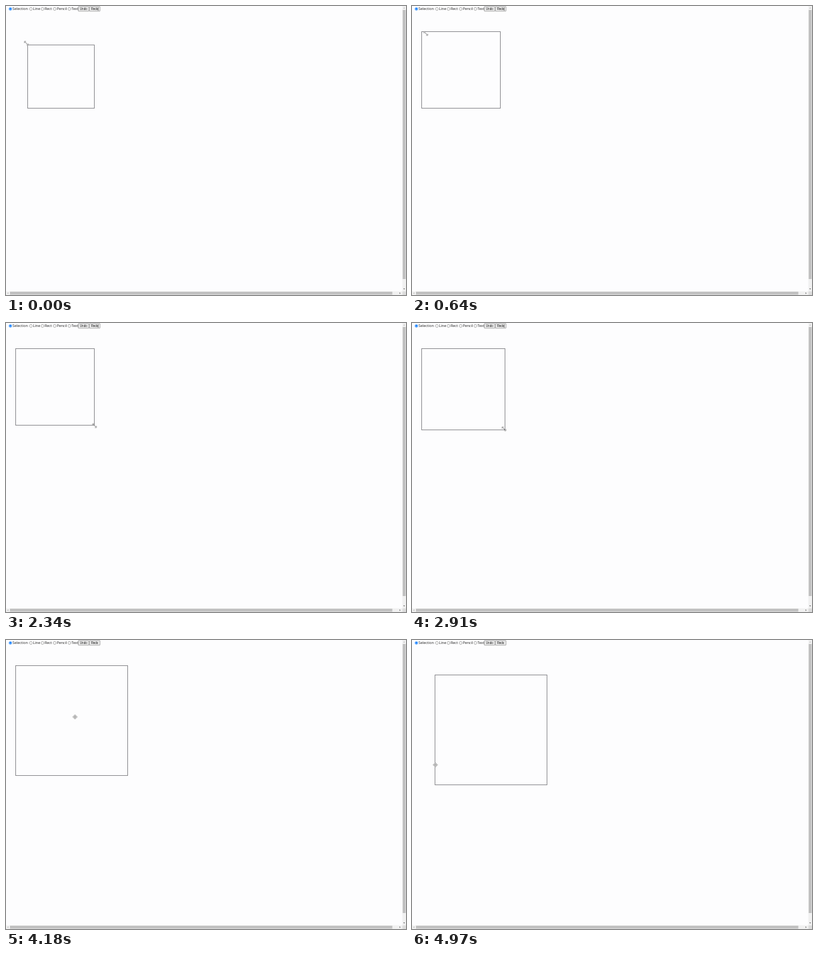
Recreate the animation shown at these times as an HTML page. Size 600x434 px, loop 5000 ms.

```html
<!DOCTYPE html>
<html lang="en">
<head>
<meta charset="utf-8">
<title>Drawing board</title>
<style>
  html, body { margin: 0; width: 100%; height: 100%; overflow: hidden; background: #fdfdfe; }
  svg { display: block; }
  .label { font: 5.45px "Open Sans", "Noto Sans", sans-serif; fill: #222; }
  .button { font: 4.6px "Liberation Sans", Arial, sans-serif; fill: #111; }
</style>
</head>
<body>
<svg width="600" height="434" viewBox="0 0 600 434">
  <g id="bar"></g>
  <path id="caret" d="M138.3 2V7" stroke="#555" stroke-width=".7"/>

  <rect id="box" fill="none" stroke="#8e8e92" shape-rendering="crispEdges"/>

  <g id="cursor" fill="#fff" stroke="#777" stroke-width=".6">
    <g id="resize">
      <path d="M-2 -2L2 2" stroke-width="1"/>
      <path d="M-3 -3H-.6L-3 -.6ZM3 3H.6L3 .6Z"/>
    </g>
    <g id="move" stroke="#999">
      <path d="M0 -3.5L3.5 0L0 3.5L-3.5 0Z" fill="#ccc"/>
      <path d="M-2 0H2M0 -2V2"/>
    </g>
    <path id="arrow" d="M0 0V5L1.1 4L2 6L2.8 5.6L2 3.7H3.5Z"/>
  </g>

  <g id="scrollbars">
    <path d="M594.5 0H600V428.5H594.5ZM0 428.5H594.5V434H0Z" fill="#f1f1f1"/>
    <path d="M594.5 428.5H600V434H594.5Z" fill="#dcdcdc"/>
    <path d="M595 6H599.5V410H595ZM6 429H579.5V433.5H6Z" fill="#c1c1c1"/>
    <path d="M596 3.6L597.2 2.2L598.4 3.6ZM3.4 430L2 431.2L3.4 432.4Z" fill="#a3a3a3"/>
    <path d="M596 424.3L597.2 425.7L598.4 424.3ZM590.4 430L591.8 431.2L590.4 432.4Z" fill="#505050"/>
  </g>
</svg>
<script>
const $ = id => document.getElementById(id);

function set(el, attrs) {
  for (const name in attrs) el.setAttribute(name, attrs[name]);
}

function add(tag, attrs, text = "") {
  const el = document.createElementNS("http://www.w3.org/2000/svg", tag);
  set(el, attrs);
  el.textContent = text;
  $("bar").append(el);
}

const tools = { Selection: 6.6, Line: 37.4, Rect: 54.7, Pencil: 73, Text: 95 };
for (const [name, cx] of Object.entries(tools)) {
  const on = name === "Selection", stroke = on ? "#0075ff" : "#767676";
  add("circle", { cx, cy: 4.4, r: 2.1, fill: "#fff", stroke, "stroke-width": .6 });
  if (on) add("circle", { cx, cy: 4.4, r: 1.4, fill: stroke });
  add("text", { x: cx + 3.2, y: 6.2, class: "label" }, name);
}
["Undo", "Redo"].forEach((name, i) => {
  const x = 108.4 + i * 16.6;
  add("rect", { x, y: .9, width: 16, height: 6.9, rx: .6, fill: "#efefef", stroke: "#767676", "stroke-width": .6 });
  add("text", { x: x + 2.4, y: 6, class: "button" }, name);
});

// Each gesture eases the pointer to a point; a drag takes corners of the box along
const gestures = [
  { from: 0, to: 510, x: 12.5, y: 36, cursor: "resize", drag: ["topLeft"] },
  { from: 580, to: 680, x: 25, y: 44, cursor: "resize" },
  { from: 680, to: 850, x: 125, y: 128, cursor: "move" },
  { from: 850, to: 940, x: 153, y: 150, cursor: "arrow" },
  { from: 940, to: 1370, x: 133.6, y: 154, cursor: "arrow" },
  { from: 1600, to: 2090, x: 137, y: 159, cursor: "resize" },
  { from: 2120, to: 2490, x: 130.5, y: 151.5, cursor: "resize" },
  { from: 2740, to: 3440, x: 180.5, y: 201.5, cursor: "resize", drag: ["bottomRight"] },
  { from: 3460, to: 3670, x: 177, y: 196, cursor: "resize" },
  { from: 3730, to: 4180, x: 103.5, y: 115.5, cursor: "move" },
  { from: 4240, to: 4380, x: 85, y: 123, cursor: "move" },
  { from: 4380, to: 4820, x: 105, y: 137, cursor: "move", drag: ["topLeft", "bottomRight"] },
  { from: 4840, to: 4970, x: 35, y: 187.5, cursor: "move" },
];

const ease = k => k * k * (3 - 2 * k);
const snap = v => Math.floor(v) + .5;

function pose(t) {
  const p = { x: 30.5, y: 56, topLeft: [32.5, 58.5], bottomRight: [132.5, 153.5] };
  for (const { from, to, x, y, cursor, drag = [] } of gestures) {
    if (t < from) break;
    const k = ease(Math.min(1, (t - from) / (to - from)));
    const dx = (x - p.x) * k, dy = (y - p.y) * k;
    p.x += dx;
    p.y += dy;
    p.cursor = cursor;
    for (const corner of drag) {
      p[corner][0] += dx;
      p[corner][1] += dy;
    }
  }
  return p;
}

function draw(now) {
  const t = now % 5000, p = pose(t);
  const [x, y] = p.topLeft.map(snap), [right, bottom] = p.bottomRight.map(snap);
  set($("box"), { x, y, width: right - x, height: bottom - y });
  set($("cursor"), { transform: `translate(${p.x} ${p.y})` });
  for (const id of ["resize", "move", "arrow"]) $(id).style.display = id === p.cursor ? "" : "none";
  $("caret").style.display = t < 3900 ? "" : "none";
  requestAnimationFrame(draw);
}
requestAnimationFrame(draw);
</script>
</body>
</html>
```
